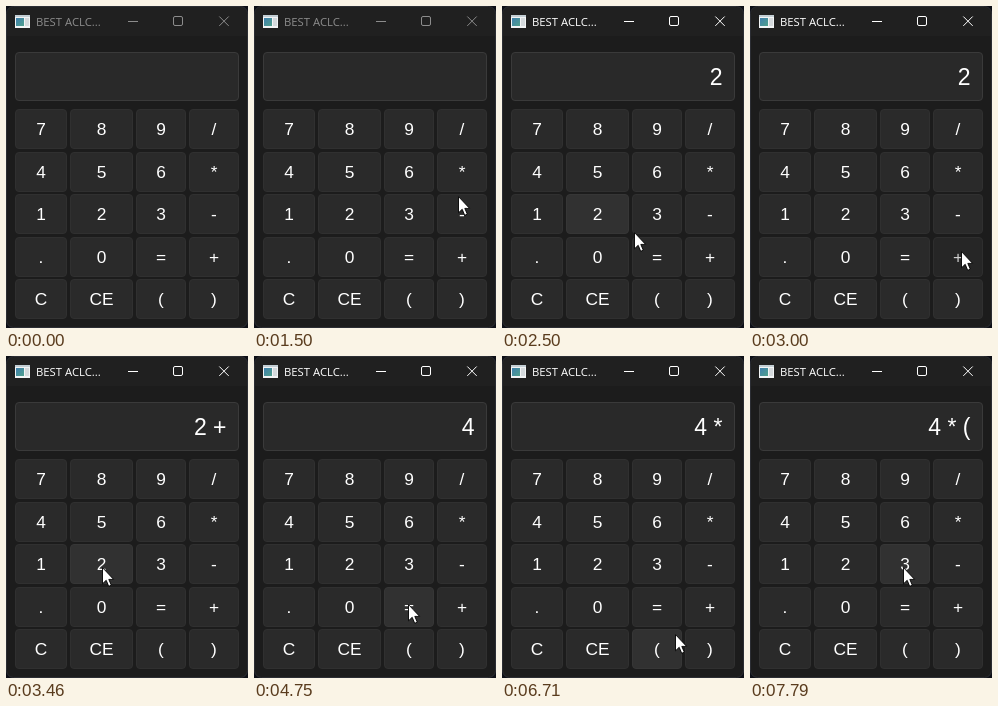
Animation of 242 by 322 pixels, one loop 8 s. Source, as an HTML page:

```html
<!DOCTYPE html>
<html lang="en">
<head>
<meta charset="utf-8">
<title>Calculator</title>
<style>
  html, body { margin: 0; width: 100%; height: 100%; overflow: hidden; background: #0d0f16; }
  svg { display: block; width: 242px; height: 322px; }
  text { font-family: "Liberation Sans", Arial, sans-serif; fill: #fff; }
  .title { font: 11.3px "Open Sans", "Noto Sans", sans-serif; }
  .key text { font-size: 17.33px; text-anchor: middle; }
  .key rect { fill: #2a2a2a; stroke: #303030; }
  .key.hover rect { fill: #313131; stroke: #363636; }
  .key.down rect { fill: #262626; stroke: #2e2e2e; }
  .key.down text { fill: #cfcfcf; }
  .out { font-size: 23px; text-anchor: end; white-space: pre; }
  .bar text { fill: #fff; }
  .bar path, .bar .max { fill: none; stroke: #fff; }
  .bar.idle text { fill: #8c8c8c; }
  .bar.idle path, .bar.idle .max { stroke: #8c8c8c; }
</style>
</head>
<body>
<svg viewBox="0 0 242 322">
  <defs>
    <linearGradient id="teal" x2="1" y2="1">
      <stop stop-color="#3f7fae"/>
      <stop offset="1" stop-color="#4fa08c"/>
    </linearGradient>
  </defs>
  <rect width="242" height="322" fill="#0d0f16"/>
  <rect x=".5" y=".5" width="241" height="321" rx="7" fill="#1c1c1c"/>
  <path d="M1 30V8a7 7 0 0 1 7-7H234a7 7 0 0 1 7 7V30Z" fill="#202020"/>
  <rect x=".5" y=".5" width="241" height="321" rx="7" fill="none" stroke="#2c2e34"/>
  <g id="bar" class="bar idle">
    <rect x="9" y="9" width="15" height="13" fill="#f2f4f5"/>
    <rect x="9" y="9" width="15" height="2" fill="#c3ced4"/>
    <rect x="10" y="12" width="8" height="8" fill="url(#teal)"/>
    <rect x="19" y="12" width="4" height="8" fill="#d5dadd"/>
    <text class="title" x="30" y="20">BEST ACLC...</text>
    <path d="M122 15.5H132M213.3 10.5L222.7 19.9M222.7 10.5L213.3 19.9"/>
    <rect class="max" x="167.5" y="10.5" width="9" height="9" rx="1.5"/>
  </g>
  <rect x="9.5" y="46.5" width="223" height="48" rx="3.5" fill="#292929" stroke="#3a3a3a"/>
  <text id="out" class="out" x="220.5" y="79"></text>
  <g id="keys"></g>
  <path id="cursor" d="M.5 .6V16.8L4.2 13.3L6.7 19.3L9.3 18.2L6.8 12.4H11.6Z"
        fill="#fff" stroke="#000" stroke-width=".9" stroke-linejoin="round"/>
</svg>
<script>
const FPS = 24, TICKS = 192;
const $ = id => document.getElementById(id);
const NS = "http://www.w3.org/2000/svg";

function add(parent, tag, attrs) {
  const el = document.createElementNS(NS, tag);
  for (const k in attrs) el.setAttribute(k, attrs[k]);
  return parent.appendChild(el);
}

// key grid: [left, width] per column, [top, height] per row
const COLS = [[9, 52], [64, 63], [130, 50], [183, 50]];
const ROWS = [[103, 40], [146, 40], [188, 40], [231, 40], [273, 40]];
const LABELS = ["7 8 9 /", "4 5 6 *", "1 2 3 -", ". 0 = +", "C CE ( )"];
const keys = {};

LABELS.forEach((line, r) => line.split(" ").forEach((label, c) => {
  const [x, w] = COLS[c], [y, h] = ROWS[r];
  const g = add($("keys"), "g", { class: "key" });
  add(g, "rect", { x: x + .5, y: y + .5, width: w - 1, height: h - 1, rx: 3.5 });
  add(g, "text", { x: x + w / 2, y: y + 26 }).textContent = label;
  keys[label] = g;
}));

// all times below are in ticks of 1/24 s
const CLICKS = [
  [52, "2", "2"], [72, "+", "2 +"], [87, "2", "2 + 2"],
  [109, "=", "4"], [152, "*", "4 *"], [171, "(", "4 * ("]
];
const HOVERS = [
  [52, 61, "2"], [61, 66, "="], [70, 76, "+"], [81, 95, "2"],
  [98, 139, "="], [143, 157, "*"], [161, 176, "("], [180, 192, "3"]
];

const ease = {
  in: p => p ** 1.5,
  out: p => 1 - (1 - p) ** 2,
  both: p => p * p * (3 - 2 * p)
};
// [tick, x, y, easing towards the next point]
const PATH = [
  [36, 204, 190, "out"], [48, 107, 203], [56, 107, 203, "in"],
  [60, 132, 226, "out"], [70, 211, 245], [73, 211, 245, "both"],
  [83, 96, 211], [92, 96, 211, "both"], [101, 154, 248],
  [136, 154, 248, "both"], [146, 206, 172], [155, 206, 172, "in"],
  [161, 173, 278, "out"], [165, 166, 293], [172, 166, 293, "both"],
  [183, 153, 212], [186, 153, 212], [187, 153, 211], [192, 153, 211]
];

function place(t) {
  const i = PATH.findIndex((p, n) => n + 1 < PATH.length && t < PATH[n + 1][0]);
  const a = PATH[i], b = PATH[i + 1];
  const p = (t - a[0]) / (b[0] - a[0]);
  const k = a[3] ? ease[a[3]](p) : p;
  return [1, 2].map(n => Math.round(a[n] + (b[n] - a[n]) * k));
}

function draw(t) {
  $("bar").classList.toggle("idle", t < CLICKS[0][0]);

  let text = "";
  for (const [at, , shown] of CLICKS) if (t > at) text = shown;
  $("out").textContent = text;

  for (const label in keys) {
    const hover = HOVERS.some(([a, b, k]) => k === label && t >= a && t < b);
    const down = CLICKS.some(([at, k]) => k === label && t === at);
    keys[label].setAttribute("class", "key" + (down ? " down" : hover ? " hover" : ""));
  }

  const visible = t >= PATH[0][0];
  $("cursor").style.visibility = visible ? "visible" : "hidden";
  if (visible) $("cursor").setAttribute("transform", `translate(${place(t)})`);
}

const start = performance.now();
let last = -1;
function loop() {
  const t = Math.floor((performance.now() - start) / 1000 * FPS + .1) % TICKS;
  if (t !== last) draw(last = t);
  requestAnimationFrame(loop);
}
loop();
</script>
</body>
</html>
```
